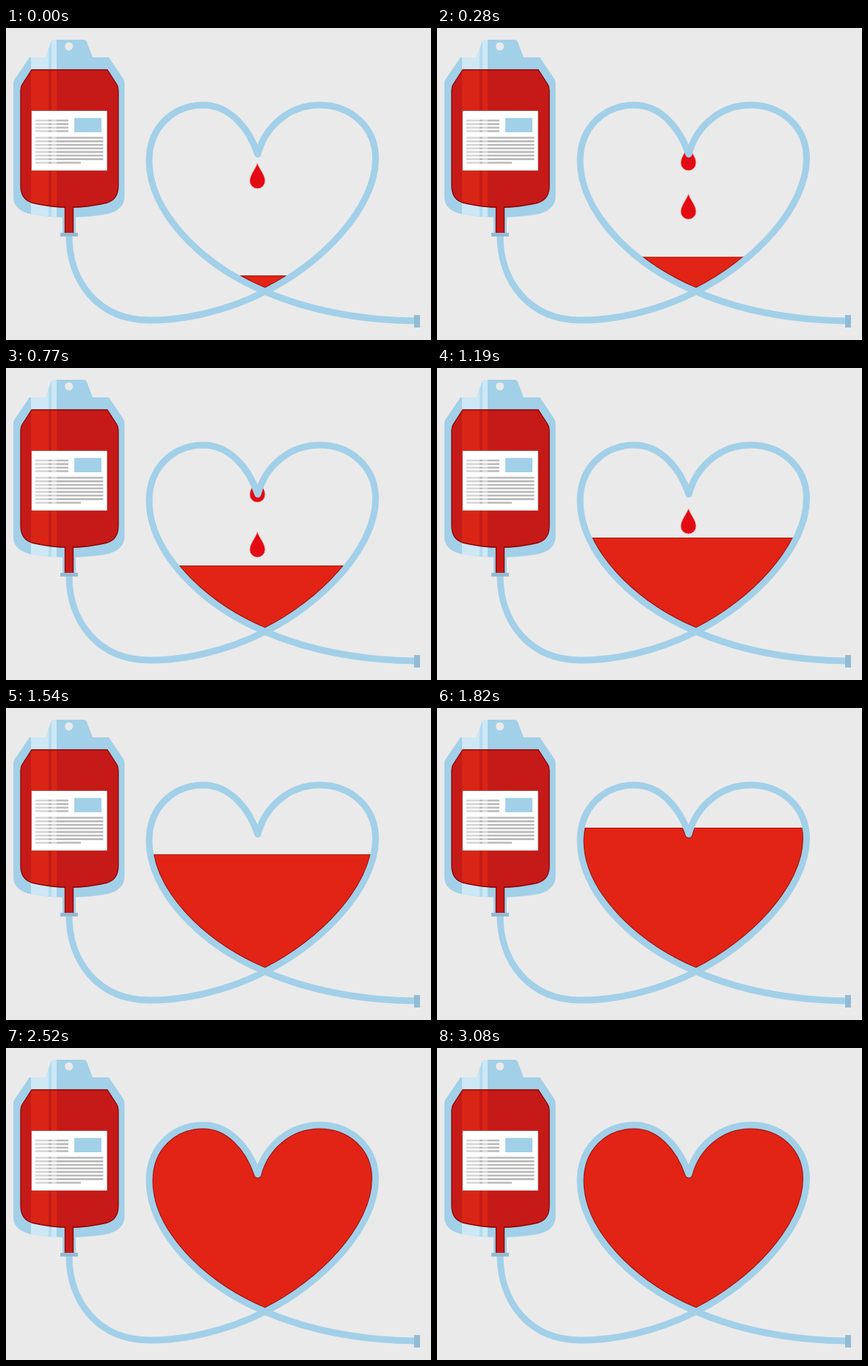
These frames come from a looping animation (579 px wide and 425 px high, 3.15 s). An HTML page:

```html
<!DOCTYPE html>
<html>
<head>
<meta charset="utf-8">
<style>
html, body { margin: 0; width: 100%; height: 100%; overflow: hidden; background: #eaeaea; }
svg { display: block; }
</style>
</head>
<body>
<svg width="579" height="425" viewBox="0 0 579 425">
  <defs>
    <path id="heart" d="M353 359C264 321.500 195 249 195 181C195 135 228 105 269 105C303 105 330 134 343 172C353 134 386 105 427 105C471 105 503.500 136 503.500 178C503.500 245 430 321 353 359Z"/>
    <path id="shell" d="M32 40H54L61 20Q62 16 67 16H105Q109 16 110 19L118 40H140L159 68Q161.500 71 161.500 76V230Q161 247 140 253Q86 263 31 253Q10 247 10 230V76Q10 71 13 68Z"/>
    <path id="blood" d="M35 57H138L151 77Q153 80 153 85V215Q153 233 138 238Q86 250.500 35 238Q20 233 20 215V85Q20 80 22 77Z"/>
    <path id="drop" d="M0-35C3-26 10.500-19 10.500-10.500A10.500 10.500 0 0 1-10.500-10.500C-10.500-19-3-26 0-35Z" fill="#e30b13" stroke="#f0c4c0" stroke-width=".8"/>
    <path id="stripes" d="M34 10H58V270H34ZM62 10H69V270H62Z"/>
    <clipPath id="inHeart"><use href="#heart"/></clipPath>
    <clipPath id="inShell"><use href="#shell"/></clipPath>
    <clipPath id="inBlood"><use href="#blood"/></clipPath>
    <clipPath id="below"><rect id="fill" width="579" height="425"/></clipPath>
  </defs>

  <!-- bag -->
  <path d="M77 250H95V281H77Z" fill="#a2d0e8"/>
  <use href="#shell" fill="#a2d0e8"/>
  <g clip-path="url(#inShell)">
    <use href="#stripes" fill="#cde7f5"/>
    <path d="M58 10H62V270H58Z" fill="#b3daed"/>
  </g>
  <circle cx="85.700" cy="25" r="5.500" fill="#eaeaea"/>
  <use href="#blood" fill="#c61a18"/>
  <g clip-path="url(#inBlood)">
    <use href="#stripes" fill="#d92515"/>
  </g>
  <use href="#blood" fill="none" stroke="#8a0505" stroke-width="1.300"/>
  <path d="M80.500 243V280H91.500V243" fill="#c61a18" stroke="#8a0505" stroke-width="1.300"/>
  <path d="M34.500 112.500H138V194.500H34.500Z" fill="#fff" stroke="#a5120e" stroke-width=".6"/>
  <path d="M93 122.500H130V142H93Z" fill="#a2d0e8"/>
  <path id="lines" stroke="#b9b9b9" stroke-width="2.600"/>
  <path d="M35 113H58V194H35ZM62 113H69V194H62Z" fill="#fff" opacity=".4"/>

  <!-- heart contents -->
  <g clip-path="url(#inHeart)">
    <g id="drops"></g>
    <g clip-path="url(#below)">
      <use href="#heart" fill="#e12415" stroke="#9c0f0c" stroke-width="11" stroke-linejoin="round"/>
    </g>
    <path id="surface" d="M190 .5H510" stroke="#b3130e"/>
  </g>

  <!-- tube -->
  <g fill="none" stroke="#a2d0e8" stroke-width="9" stroke-linejoin="round">
    <use href="#heart"/>
    <path d="M86 283C86 345 125 398 196 398C240 398 298 387 353 359"/>
    <path d="M353 359C420 388 490 398 558 399"/>
  </g>
  <path d="M74 279H98V284H74ZM556 391H564V408H556Z" fill="#92bbd4"/>
</svg>
<script>
const LOOP = 3150, STEP = 70;
const $ = id => document.getElementById(id);

let d = '';
for (let i = 0; i < 4; i++) d += `M40 ${126 + i * 4.85}H85`;
for (let i = 0; i < 8; i++) d += `M40 ${149.5 + i * 4.85}H${i < 7 ? 132.5 : 102}`;
$('lines').setAttribute('d', d);

// [time, surface height]
const levels = [[0, 337], [490, 293], [770, 269], [1190, 231], [1540, 199.5], [2100, 126.5], [2300, 100], [LOOP, 100]];

function levelAt(t) {
  const i = levels.findIndex(k => k[0] > t);
  const [t0, y0] = levels[i - 1], [t1, y1] = levels[i];
  return y0 + (y1 - y0) * (t - t0) / (t1 - t0);
}

// time at which each drop emerges from the tip
const births = [-365, 140, 770];
const drops = births.map(() => {
  const use = document.createElementNS('http://www.w3.org/2000/svg', 'use');
  use.setAttribute('href', '#drop');
  return $('drops').appendChild(use);
});

function dropBottom(age) {
  const late = Math.max(0, age - 630);
  return 183 + .0698 * age + 7.8e-5 * age * age + 7e-4 * late * late;
}

function draw(now) {
  const t = Math.floor(now % LOOP / STEP) * STEP;
  const y = levelAt(t);
  $('fill').setAttribute('y', y);
  $('surface').setAttribute('transform', `translate(0 ${y})`);
  drops.forEach((drop, i) => {
    const age = t - births[i], bottom = dropBottom(age);
    const shown = age > -75 && bottom - 35 < y;
    drop.setAttribute('visibility', shown ? 'visible' : 'hidden');
    drop.setAttribute('transform', `translate(342.5 ${bottom})`);
  });
}

const start = performance.now();
function tick() {
  draw(performance.now() - start);
  requestAnimationFrame(tick);
}
tick();
</script>
</body>
</html>
```
